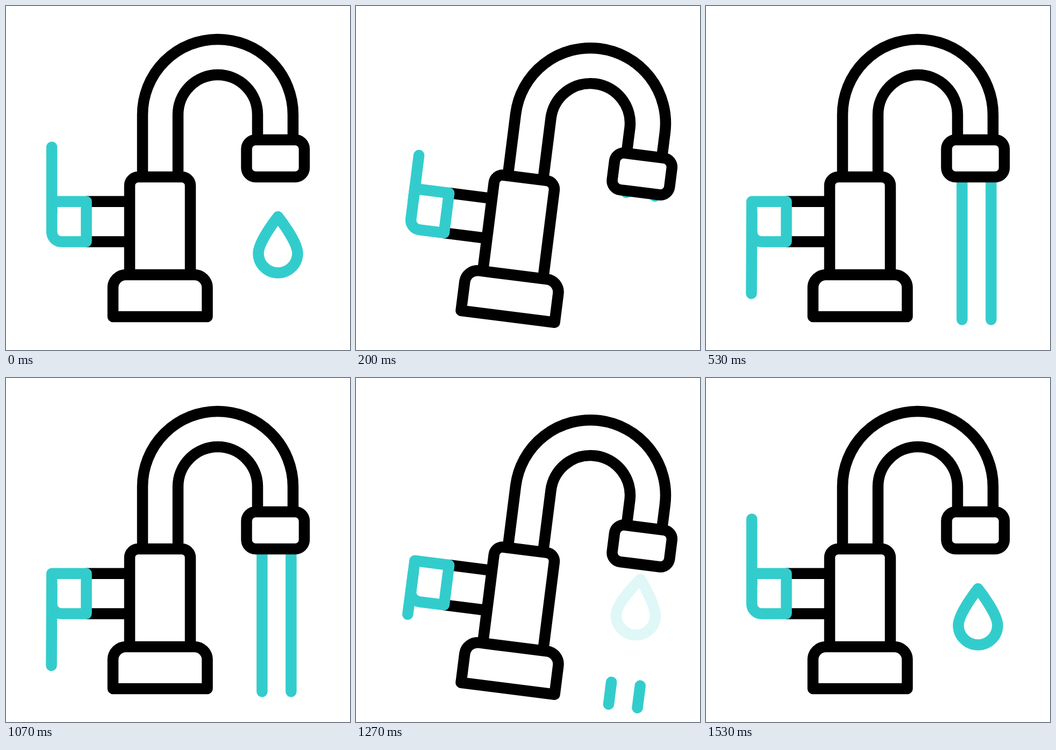
These frames come from a looping animation (640x640 px, 1670 ms). An HTML page:

```html
<!DOCTYPE html>
<html lang="en">
<head>
<meta charset="utf-8">
<title>Faucet</title>
<style>
  html, body { margin: 0; width: 100%; height: 100%; overflow: hidden; background: #fff; }
  svg { display: block; width: 100%; height: 100%; }
  path { fill: none; stroke: #000; stroke-width: 20.5; stroke-linejoin: round; }
  .blue { stroke: #33cccc; stroke-linecap: round; }
</style>
</head>
<body>
<svg viewBox="0 0 640 640">
  <g id="faucet">
    <path id="water" class="blue"/>
    <path id="drop" class="blue" d="M506 392C506 392 469.5 438 469.5 460A36.5 36.5 0 0 0 542.5 460C542.5 438 506 392 506 392Z"/>
    <path d="M149 363.7H230M149 438.5H230"/>
    <path d="M254 318V202A140 140 0 0 1 534 202V249M320 318V202A74 74 0 0 1 468 202V249"/>
    <path d="M464.5 249H538A17 17 0 0 1 555 266V301A17 17 0 0 1 538 318H464.5A17 17 0 0 1 447.5 301V266A17 17 0 0 1 464.5 249Z"/>
    <path d="M230 500V334A16 16 0 0 1 246 318H327A16 16 0 0 1 343 334V500"/>
    <path d="M199 578V524A24 24 0 0 1 223 500H350.5A24 24 0 0 1 374.5 524V578Z"/>
    <path class="blue" d="M85.2 363.7H149.5V438.5H103.2A18 18 0 0 1 85.2 420.5Z"/>
    <path id="lever" class="blue"/>
  </g>
</svg>
<script>
const LOOP = 1670, FPS = 30, CLOSING = 32;
const [faucet, water, drop, lever] =
  ["faucet", "water", "drop", "lever"].map(id => document.getElementById(id));

const mix = (a, b, u) => a + (b - a) * u;

// Eased 0..1 progress of frame f between two key frames
function ease(f, from, to) {
  const u = Math.min(1, Math.max(0, (f - from) / (to - from)));
  return u * u * (3 - 2 * u);
}

function tilt(f) {
  if (f < 5) return mix(0, 8, ease(f, 0, 5));
  if (f < 11) return mix(8, -2.9, ease(f, 5, 11));
  return mix(-2.9, 0, ease(f, 11, 14));
}

function render(time) {
  const f = Math.floor((time % LOOP + 5) * FPS / 1000);
  const closing = f >= CLOSING;
  const k = closing ? f - CLOSING : f;

  faucet.setAttribute("transform", `rotate(${tilt(k)} 286.5 544)`);

  const down = closing ? 1 - ease(k, 4, 10) : ease(k, 4.58, 10.58);
  lever.setAttribute("d", `M85.2 385L${mix(85.2, 84.5, down)} ${mix(262.5, 535, down)}`);

  const top = closing ? mix(318, 583.5, ease(k, 0, 8)) : 318;
  const end = closing ? 583.5 : mix(318, 583.5, ease(k, 5.3, 15.5));
  water.setAttribute("d", end - top > 0.5 ? `M476.4 ${top}V${end}M530.4 ${top}V${end}` : "");

  const shown = closing ? ease(k, 4, 12) : 1 - ease(k, 0, 5);
  const shift = (1 - shown) * (closing ? -55.5 : 91);
  drop.setAttribute("opacity", shown);
  drop.setAttribute("transform", `translate(0 ${shift})`);
}

function tick() {
  render(performance.now());
  requestAnimationFrame(tick);
}
tick();
</script>
</body>
</html>
```
